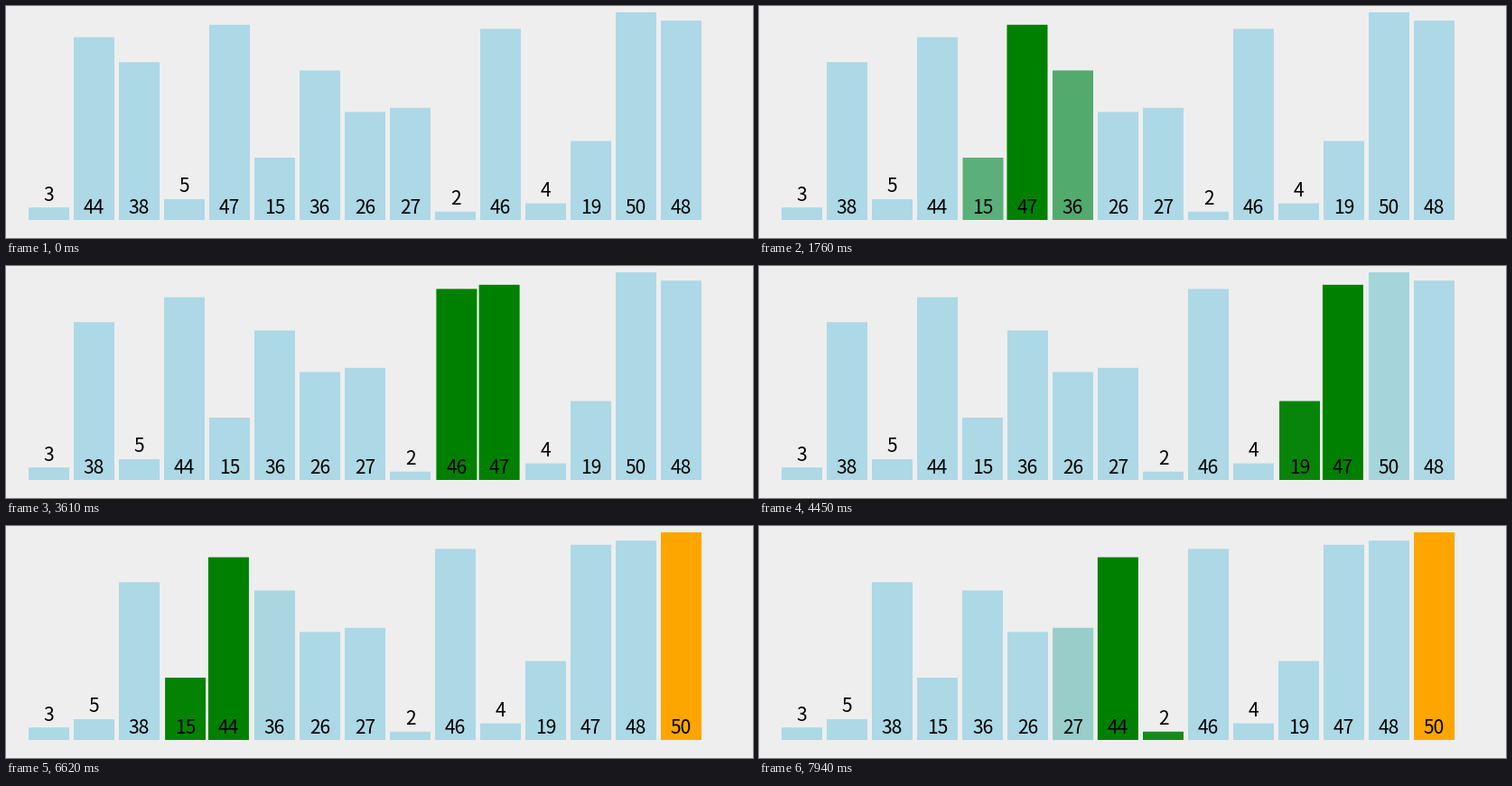
Recreate the animation shown at these times as a matplotlib script. Size 827 px wide and 257 px high, loop 8000 ms.

```python
import numpy as np
import matplotlib.pyplot as plt
from matplotlib.animation import FuncAnimation
from matplotlib.patches import Rectangle

W, H, DPI = 827, 257, 64
LOOP, INTERVAL = 8000, 20

VALUES = [3, 44, 38, 5, 47, 15, 36, 26, 27, 2, 46, 4, 19, 50, 48]
LEFT, PITCH, BAR_W, BASE, UNIT = 25, 50, 45, 237, 4.6
TEXT_GAP, FONT_PX = 7.5, 21

BLUE = np.array([173, 216, 230]) / 255
GREEN = np.array([0, 128, 0]) / 255
ORANGE = np.array([255, 165, 0]) / 255

# Each sorting step begins before the previous transition has quite ended.
FIRST_STEP, STEP, FADE = 60, 197.6, 240
# The picture refreshes in ticks.
TICK, TICK_SHOWN, TICK_TIME = 77.1, 120, 144


def ease(p):
    p = min(max(p, 0), 1)
    return 4 * p**3 if p < 0.5 else 1 - 4 * (1 - p)**3


def snapshot(order, lit, done):
    """One row per bar: x, r, g, b."""
    rows = np.empty((len(order), 4))
    for slot, bar in enumerate(order):
        color = ORANGE if bar in done else GREEN if slot in lit else BLUE
        rows[bar] = [LEFT + PITCH * slot, *color]
    return rows


def bubble_sort():
    order = list(range(len(VALUES)))
    done = set()
    yield snapshot(order, (), done)
    for end in range(len(order) - 1, 0, -1):
        for i in range(end):
            pair = (i, i + 1)
            yield snapshot(order, pair, done)
            if VALUES[order[i]] > VALUES[order[i + 1]]:
                order[i], order[i + 1] = order[i + 1], order[i]
                yield snapshot(order, pair, done)
        yield snapshot(order, (), done)
        done.add(order[end])
        yield snapshot(order, (), done)


goals = list(bubble_sort())
starts = [goals[0], goals[0]]
for goal in goals[1:]:
    last = starts[-1]
    starts.append(last + (goal - last) * ease(STEP / FADE))


def pose(t):
    if t < FIRST_STEP:
        return goals[0]
    step, elapsed = divmod(t - FIRST_STEP, STEP)
    k = int(step) + 1
    return starts[k] + (goals[k] - starts[k]) * ease(elapsed / FADE)


def clock(t):
    if t < TICK_SHOWN:
        return 0
    tick = min((t - TICK_SHOWN) // TICK, 101)
    return TICK_TIME + tick * TICK


fig = plt.figure(figsize=(W / DPI, H / DPI), dpi=DPI, facecolor="#eeeeee")
ax = fig.add_axes([0, 0, 1, 1])
ax.set_xlim(0, W)
ax.set_ylim(H, 0)
ax.axis("off")

bars, labels = [], []
for value in VALUES:
    height = value * UNIT
    bar = Rectangle((0, BASE - height), BAR_W, height, lw=0, snap=False)
    bars.append(ax.add_patch(bar))
    # Short bars carry their number on top.
    foot = BASE - height if value < 10 else BASE
    labels.append(ax.text(0, foot - TEXT_GAP, str(value), ha="center",
                          va="baseline", color="black", zorder=3,
                          family="Noto Sans CJK JP",
                          fontsize=FONT_PX * 72 / DPI))


def draw(frame):
    for bar, label, row in zip(bars, labels, pose(clock(frame * INTERVAL))):
        bar.set_x(row[0])
        bar.set_facecolor(row[1:])
        label.set_x(row[0] + BAR_W / 2)
    return bars + labels


anim = FuncAnimation(fig, draw, frames=LOOP // INTERVAL, interval=INTERVAL,
                     repeat=True, repeat_delay=0)
plt.show()
```
